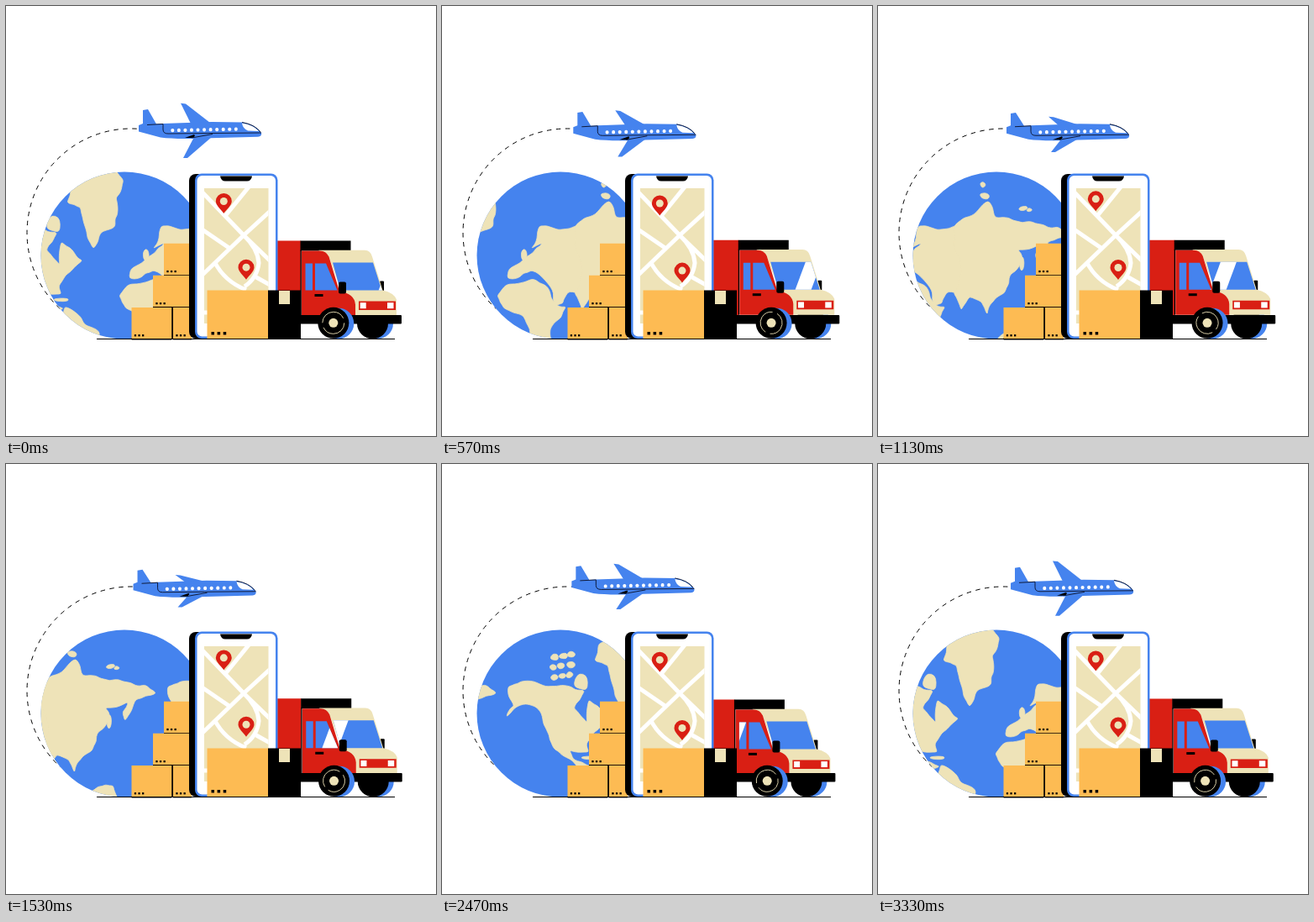
Animation of 512x512 px, one loop 3370 ms. Source, as an HTML page with a canvas:

```html
<!DOCTYPE html>
<html lang="en">
<head>
<meta charset="utf-8">
<style>
html, body { margin: 0; width: 100%; height: 100%; overflow: hidden; background: #fff; }
canvas { display: block; width: 100vw; height: 100vh; }
</style>
</head>
<body>
<canvas id="stage" width="512" height="512"></canvas>
<script>
const ctx = document.getElementById('stage').getContext('2d');
const LOOP = 3370, MAP_WIDTH = 408, TAU = Math.PI * 2;
const BLUE = '#4583ee', SAND = '#eee3b8', RED = '#d91f14', ORANGE = '#fdbb53', BLACK = '#000', WHITE = '#fff';

function rect(color, x, y, w, h, r = 0) {
  ctx.fillStyle = color;
  ctx.beginPath();
  ctx.roundRect(x, y, w, h, r);
  ctx.fill();
}
function disc(color, x, y, r) {
  ctx.fillStyle = color;
  ctx.beginPath();
  ctx.arc(x, y, r, 0, TAU);
  ctx.fill();
}
function shape(color, d) {
  ctx.fillStyle = color;
  ctx.fill(new Path2D(d));
}
function stroke(color, width, d) {
  ctx.strokeStyle = color;
  ctx.lineWidth = width;
  ctx.stroke(new Path2D(d));
}
function clipped(path, draw) {
  ctx.save();
  ctx.clip(path);
  draw();
  ctx.restore();
}

let seed = 7;
function random() {
  seed = (seed * 16807) % 2147483647;
  return seed / 2147483647;
}

// Splits an edge at displaced midpoints until its pieces are short.
function ragged(a, b) {
  const dx = b[0] - a[0], dy = b[1] - a[1];
  if (Math.hypot(dx, dy) < 8) return [a];
  const k = (random() - 0.5) * 0.24;
  const mid = [(a[0] + b[0]) / 2 - dy * k, (a[1] + b[1]) / 2 + dx * k];
  return [...ragged(a, mid), ...ragged(mid, b)];
}
function smooth(pts) {
  const path = new Path2D();
  const mid = (a, b) => [(a[0] + b[0]) / 2, (a[1] + b[1]) / 2];
  path.moveTo(...mid(pts[pts.length - 1], pts[0]));
  pts.forEach((p, i) => path.quadraticCurveTo(...p, ...mid(p, pts[(i + 1) % pts.length])));
  path.closePath();
  return path;
}
function coast(dx, keys) {
  const pts = keys.split(' ').map(p => p.split(',').map(Number)).map(([x, y]) => [x + dx, y]);
  return smooth(pts.flatMap((p, i) => ragged(p, pts[(i + 1) % pts.length])));
}
function island(x, y, rx, ry) {
  return smooth(Array.from({ length: 7 }, (_, i) => {
    const a = i / 7 * TAU, r = 0.85 + random() * 0.5;
    return [x + Math.cos(a) * rx * r, y + Math.sin(a) * ry * r];
  }));
}

const greenland = coast(0, '95,199 78,214 73,234 89,240 94,262 104,289 114,269 130,262 131,228 140,207 131,196');
const northAmerica = coast(343, '35,265 50,259 80,265 105,264 126,270 113,291 129,308 131,281 156,303 128,333 131,343 108,341 112,351 134,360 122,363 98,346 80,315 71,292 53,286 33,301 42,288');
const southAmerica = coast(0, '62,378 70,358 83,365 112,390 110,405 75,405');
const africa = coast(69, '66,345 80,331 107,325 126,335 138,357 148,358 131,381 131,400 106,400 98,370 74,360');
const europe = coast(137, '10,324 12,313 37,296 52,282 38,289 48,262 84,265 105,260 110,346 84,340 76,354 67,357 57,329 46,318 38,315 22,324');
const asia = coast(137, '90,264 108,251 131,232 139,251 172,258 213,263 227,273 203,280 190,306 187,295 194,283 166,290 172,300 158,319 151,341 137,352 130,367 123,352 109,346 99,362 90,342');
const australia = coast(185, '92,400 110,384 128,383 134,400');
const islands = [
  island(262, 213, 3, 3), island(264, 226, 5, 4), island(310, 241, 5, 2.5), island(317, 243, 3, 2),
  island(167, 297, 3, 7), island(308, 306, 2.5, 8), island(474, 350, 9, 1.8), island(465, 260, 8, 9)
];
// Arctic archipelago: three loose rows of small islands.
for (let i = 0; i < 9; i++) {
  const row = Math.floor(i / 3);
  islands.push(island(431 + (i % 3) * 10 + random() * 3, 230 + row * 12 - (i % 3) * 1.5, 4.6, 3.3));
}
const lands = [greenland, northAmerica, southAmerica, africa, europe, asia, australia, ...islands];

const globe = new Path2D();
globe.arc(141, 297, 99.5, 0, TAU);
function drawGlobe(t) {
  ctx.fillStyle = BLUE;
  ctx.fill(globe);
  clipped(globe, () => {
    ctx.translate(-MAP_WIDTH * (t / LOOP + 1), 0);
    ctx.lineWidth = 0.8;
    ctx.fillStyle = ctx.strokeStyle = SAND;
    for (let i = 0; i < 3; i++) {
      lands.forEach(land => { ctx.fill(land); ctx.stroke(land); });
      ctx.translate(MAP_WIDTH, 0);
    }
  });
}

function drawTrail(t) {
  ctx.save();
  ctx.setLineDash([5.5, 5.5]);
  ctx.lineDashOffset = -t / LOOP * 110;
  ctx.strokeStyle = BLACK;
  ctx.lineWidth = 1;
  ctx.beginPath();
  ctx.arc(149, 270, 124, TAU * 0.37, TAU * 0.762);
  ctx.stroke();
  ctx.restore();
}

function drawPlane(a) {
  const sway = Math.cos(a + 0.35);
  const upper = 123.3 - 8 * sway, lower = 175.3 + 5.7 * Math.cos(a + 0.15);
  ctx.save();
  ctx.translate(-3.3 + 3.3 * Math.cos(a), 2.6 * Math.sin(a));
  shape(BLUE, `M208 ${upper}L214 ${upper + 0.6}L243 139L220 140Z`);
  shape(BLUE, `M163 ${125 - sway}L169 ${124 - sway}L179 140.5L187 140L245 138L282 138.5Q298 142 304 151Q305 155 300 155.8L225 157.8Q200 158.5 184 156.5L158 149.5V142L163 140Z`);
  shape(BLACK, 'M213 157L224 153L227 157Z');
  shape(BLUE, `M211 ${lower}L216 ${lower}L249 152.5L225 154Z`);
  shape(WHITE, 'M281 139.5Q294 141 301 149L288 148.5Q282 146 281 139.5Z');
  stroke('#101c3c', 1, 'M168 141.5L187 140.5V147Q187 152 193 152L243 151.5L304 151M281 138.5Q296 141 303 150M221 157L246 152.5');
  for (let i = 0; i < 11; i++) rect(WHITE, 196.4 + i * 7.55, 146 - i * 0.15, 3.8, 4.2, 1.6);
  ctx.restore();
}

function dots(x, y, size, gap) {
  for (let i = 0; i < 3; i++) rect(BLACK, x + i * gap, y, size, size);
}
function drawBox(x, y, w) {
  rect(BLACK, x, y + 36, w, 2.5);
  rect(ORANGE, x, y, w, 37.3);
  dots(x + 3.3, y + 32.2, 2.3, 4.6);
}
function drawStack() {
  rect(BLACK, 196, 359, 4, 37);
  drawBox(188, 282.7, 32);
  drawBox(175, 320.8, 45);
  drawBox(149.5, 358.9, 47.7);
  drawBox(199, 358.9, 22);
}

function drawPin(x, y) {
  shape(RED, `M${x} ${y + 14.5}C${x - 3} ${y + 10} ${x - 9.5} ${y + 5} ${x - 9.5} ${y}A9.5 9.5 0 0 1 ${x + 9.5} ${y}C${x + 9.5} ${y + 5} ${x + 3} ${y + 10} ${x} ${y + 14.5}Z`);
  disc(SAND, x, y, 4.5);
}

const screen = new Path2D('M236 217H312.5V378H236Z');
function drawPhone(a) {
  rect(BLACK, 218, 200, 30, 196, 8);
  rect(BLUE, 225, 199.5, 98.5, 196.5, 8);
  rect(WHITE, 227.5, 202, 93.5, 191.5, 6);
  shape(BLACK, 'M255 202.5H293Q292 208.5 287 208.5H261Q256 208.5 255 202.5Z');
  ctx.fillStyle = SAND;
  ctx.fill(screen);
  clipped(screen, () => stroke(WHITE, 5,
    'M232 220L283 273L316 305M316 243L283 273L232 322M291 213L261 250M232 265L267 289M248 304Q260 328 286 338M283 273Q300 289 301 306Q299 324 284 334M298 323L316 333M232 365H250'));
  drawPin(259.3, 232.5 + 3 * Math.sin(2 * a));
  drawPin(286, 312.6 + 2.5 * Math.cos(2 * a - 2.18));
}

function drawWheel(x, y, angle) {
  disc(BLACK, x, y, 18.5);
  ctx.strokeStyle = SAND;
  ctx.lineWidth = 0.9;
  for (let i = 0; i < 2; i++) {
    const start = angle + i * Math.PI;
    ctx.beginPath();
    ctx.arc(x, y, 13, start, start + 2.7);
    ctx.stroke();
  }
  disc(SAND, x, y, 5.5);
}

const glass = new Path2D('M356.5 306H365V338H356.5ZM368 306H381L394.5 338H368ZM389 305H437L447.5 338H398Z');
function drawGlass(t) {
  const x = 459.4 - t * 0.0445;
  ctx.fillStyle = BLUE;
  ctx.fill(glass);
  clipped(glass, () => shape(WHITE, `M${x - 3} 304H${x + 16}L${x + 3} 339H${x - 16}Z`));
}

function drawTruck(t, a) {
  ctx.save();
  ctx.translate(2.6 * Math.sin(a), 0);
  disc(BLUE, 443, 378, 18);
  disc(BLACK, 436.5, 378, 18.5);
  ctx.save();
  ctx.translate(0, 0.5 - 0.9 * Math.sin(a));
  rect(RED, 318, 279, 33, 90);
  rect(BLACK, 350.5, 279, 60, 12);
  rect(BLACK, 445, 327, 5, 12, 1);
  shape(SAND, 'M372 290.3H427Q434 290.5 436 298L448.5 338Q462 341 465 349V368H410L385 300Z');
  shape(RED, 'M352 291H374Q381 291 384.5 298L397 339Q415 342 416 355V368H352Z');
  rect(BLACK, 350.5, 290, 1.3, 78);
  drawGlass(t);
  rect(BLACK, 396, 328, 9, 14, 2);
  rect(BLACK, 367.5, 342.5, 10, 3);
  rect(RED, 420, 351, 44, 10.5);
  rect(WHITE, 421.7, 352.7, 7, 7);
  rect(WHITE, 454, 352.7, 7.5, 7);
  ctx.restore();
  rect(BLACK, 345, 368, 126, 10.5, 1);
  disc(BLUE, 396, 378, 18.3);
  drawWheel(389.8, 377.3, t / LOOP * TAU * 2);
  ctx.restore();
}

function drawParcel() {
  rect(ORANGE, 239.5, 338.5, 73, 57.8);
  rect(BLACK, 312, 338.5, 39, 57.8);
  rect(SAND, 325, 339, 13, 16);
  dots(244.5, 388, 3.5, 7.1);
}

function frame(now) {
  const t = now % LOOP, a = t / LOOP * TAU;
  ctx.fillStyle = WHITE;
  ctx.fillRect(0, 0, 512, 512);
  drawTrail(t);
  drawGlobe(t);
  drawPlane(a);
  drawStack();
  drawTruck(t, a);
  drawPhone(a);
  drawParcel();
  rect(BLACK, 108, 396, 355, 1);
  requestAnimationFrame(frame);
}
requestAnimationFrame(frame);
</script>
</body>
</html>
```
